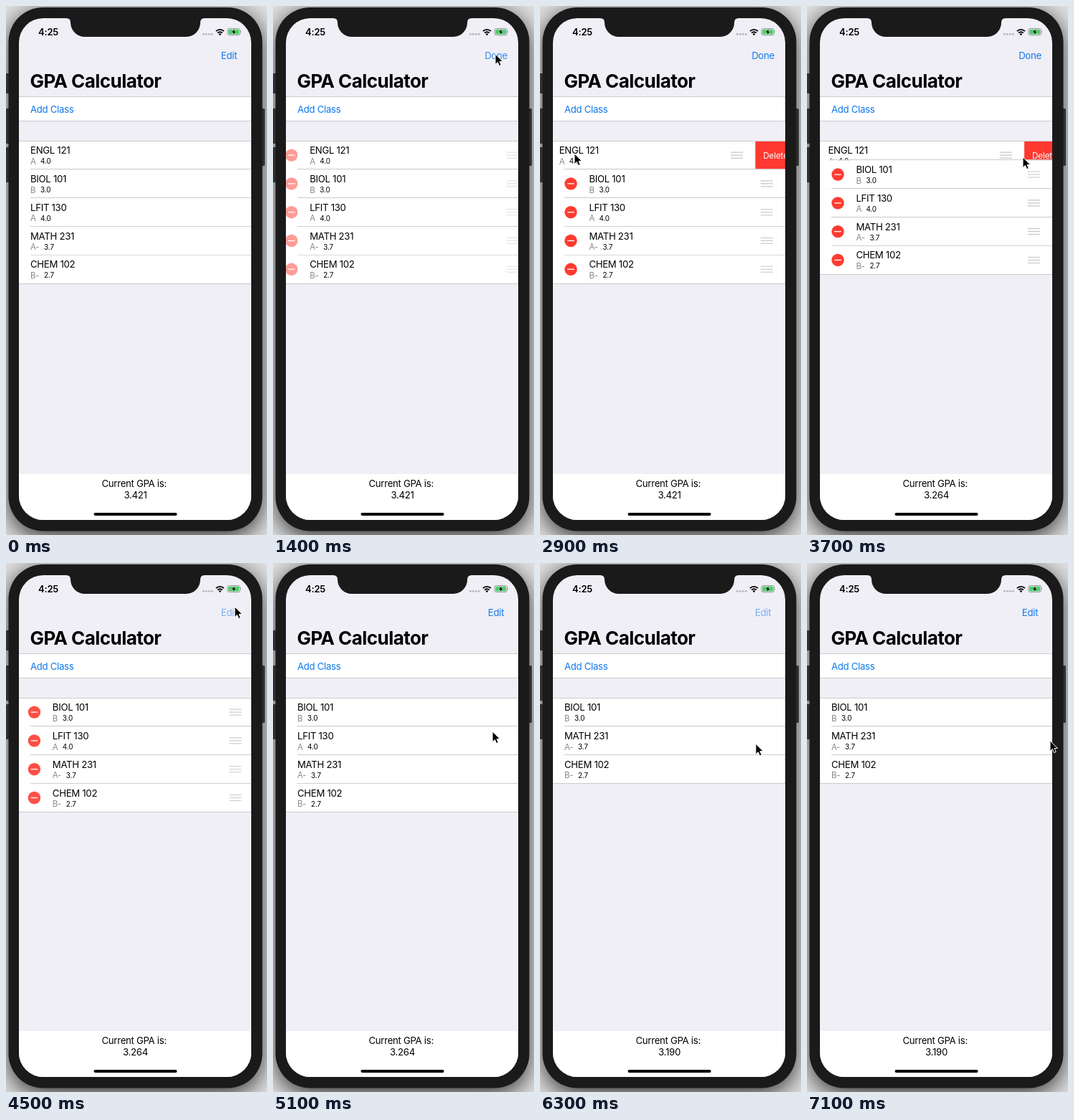
These frames come from a looping animation (364 px wide and 738 px high, 7.2 s). An HTML page:

```html
<!DOCTYPE html>
<html lang="en">
<head>
<meta charset="utf-8">
<title>GPA Calculator</title>
<style>
html, body { margin: 0; width: 100%; height: 100%; overflow: hidden; background: #ddd; }
svg { display: block; width: 364px; height: 738px; }
text { font-family: Inter, Roboto, sans-serif; font-size: 13.2px; letter-spacing: -0.3px; }
.blue { fill: #0f78ec; }
.mid { text-anchor: middle; }
.grade { font-size: 11.5px; fill: #8a8a8e; }
.points { font-size: 9.9px; letter-spacing: -0.1px; }
.del { font-size: 11.7px; letter-spacing: -0.15px; fill: #fff; }
.line { stroke: #cbcbce; stroke-width: 1; }
</style>
</head>
<body>
<svg viewBox="0 0 364 738">
  <defs>
    <clipPath id="screen"><rect x="18" y="17" width="324" height="700" rx="34"/></clipPath>
    <filter id="blur" x="-20%" y="-20%" width="140%" height="140%"><feGaussianBlur stdDeviation="16"/></filter>
  </defs>

  <rect width="364" height="738" fill="#e0e0e0"/>
  <rect x="4" y="8" width="353" height="734" rx="48" opacity=".75" filter="url(#blur)"/>
  <g fill="#303030">
    <rect x="-2" y="94" width="8" height="28"/>
    <rect x="-2" y="143" width="8" height="49"/>
    <rect x="-2" y="197" width="8" height="49"/>
    <rect x="355" y="143" width="6" height="80" rx="1.5"/>
  </g>
  <rect x="3.5" y="2" width="354" height="730.5" rx="48" fill="#1a1a1b"/>

  <g clip-path="url(#screen)">
    <rect x="18" y="17" width="324" height="700" fill="#f0eff6"/>
    <text x="33.5" y="113.5" style="font-size:26px;font-weight:700;letter-spacing:-.55px">GPA Calculator</text>
    <rect x="18" y="126.5" width="324" height="34" fill="#fff"/>
    <path class="line" d="M18 126.5H342M18 160.5H342"/>
    <text class="blue" x="34" y="148.5">Add Class</text>
    <text class="blue mid" id="button" x="311" y="73.5"></text>
    <g id="list"></g>
    <rect x="18" y="653" width="324" height="64" fill="#fff"/>
    <text class="mid" x="178.7" y="671.2">Current GPA is:</text>
    <text class="mid" id="gpa" x="180.5" y="687.3"></text>
    <rect x="122.5" y="707" width="116" height="4" rx="2"/>
  </g>

  <path fill="#1a1a1b" d="M84 16V17Q90 17 90 23A20 20 0 0 0 110 43H251A20 20 0 0 0 271 23Q271 17 277 17V16Z"/>

  <text x="45" y="41" style="font-weight:600;font-size:13px;letter-spacing:-.2px">4:25</text>
  <g fill="#b8b8be">
    <circle cx="275.3" cy="39.3" r="1.5"/><circle cx="279.3" cy="39.3" r="1.5"/>
    <circle cx="283.3" cy="39.3" r="1.5"/><circle cx="287.3" cy="39.3" r="1.5"/>
  </g>
  <g fill="none" stroke="#000" stroke-width="1.9">
    <path d="M292.9 35.2A7.6 7.6 0 0 1 303.9 35.2"/>
    <path d="M295.1 37.6A4.6 4.6 0 0 1 301.7 37.6"/>
  </g>
  <path d="M298.4 41.2L296.6 39.2A2.6 2.6 0 0 1 300.2 39.2Z"/>
  <rect x="308.9" y="31.5" width="17.6" height="9.2" rx="2.4" fill="none" stroke="#8f8f93" stroke-width=".9"/>
  <rect x="310.2" y="32.8" width="15" height="6.6" rx="1.2" fill="#4ccf68"/>
  <path d="M327.4 34.6Q329 36.1 327.4 37.6Z" fill="#8f8f93"/>
  <path d="M318.9 32.2L314.6 36.7H317.3L316.6 40L320.8 35.4H318.1Z" stroke="#d5f0dc" stroke-width="1" paint-order="stroke"/>

  <path id="cursor" d="M0 0V14.6L3.4 11.4L5.6 16.6L8.2 15.5L6 10.4H10.5Z" stroke="#fff" stroke-width="1" stroke-linejoin="round"/>
</svg>

<script>
const LOOP = 7200, STEP = 100;
const ROW = 39.8, TOP = 188.5, EDIT_SHIFT = 34.4, DELETE_W = 61;

const EDIT_ON = 1250, EDIT_OFF = 4440, ANIM = 300, FADE = 240;

// open/remove: times at which the delete button slides in and the row collapses
const classes = [
  { name: "ENGL 121", grade: "A", points: "4.0", open: 2700, remove: 3590 },
  { name: "BIOL 101", grade: "B", points: "3.0" },
  { name: "LFIT 130", grade: "A", points: "4.0", open: 5300, remove: 5840 },
  { name: "MATH 231", grade: "A-", points: "3.7" },
  { name: "CHEM 102", grade: "B-", points: "2.7" }
];
const labels = [[-ANIM, "Edit"], [EDIT_ON, "Done"], [EDIT_OFF, "Edit"], [5300, "Done"], [6240, "Edit"]];
const totals = [[0, "3.421"], [3590, "3.264"], [5840, "3.190"]];
const path = [
  [700, 329, 150], [1200, 310, 67], [1450, 310, 67], [1800, 343, 112], [2200, 316, 160],
  [2650, 48, 206], [3000, 48, 206], [3500, 301, 211], [3750, 301, 211],
  [4300, 319, 61], [4600, 319, 61], [5200, 305, 249], [5500, 245, 249],
  [5750, 309, 249], [6200, 309, 249], [6600, 257, 270], [6900, 285, 256],
  [7000, 303, 252], [7100, 339, 248]
];

const $ = id => document.getElementById(id);
const ramp = (t, start, length) => {
  const p = Math.min(1, Math.max(0, (t - start) / length));
  return p * p * (3 - 2 * p);
};
const latest = (list, t) => list.filter(item => item[0] <= t).pop();

function rowMarkup(c, y, height, edit, swipe, last) {
  const x = 34 + EDIT_SHIFT * edit - swipe;
  const mid = y + 19.6;
  const slide = EDIT_SHIFT * (1 - edit);
  const minusX = 43 - slide - swipe;
  const gripX = 316.3 + slide * 1.04 - swipe;
  const gap = c.grade.length > 1 ? 19 : 14;
  const controls = edit > 0 ? `<g opacity="${edit}">
    <circle cx="${minusX}" cy="${mid}" r="8.7" fill="#ff3b30"/>
    <path d="M${minusX - 4.8} ${mid}h9.6" stroke="#fff" stroke-width="1.3"/>
    <path d="M${gripX - 8.5} ${mid - 4}h17m-17 4h17m-17 4h17" stroke="#c5c5c9" stroke-width="1.1"/></g>` : "";
  const remove = swipe > 0 ? `<rect x="${342 - swipe}" y="${y}" width="${swipe}" height="${height}" fill="#ff3830"/>
    <text class="del" x="${353 - swipe}" y="${y + 24}">Delete</text>` : "";
  const lineY = Math.round(y + height) - 0.5;
  return `<rect x="18" y="${y}" width="324" height="${ROW}" fill="#fff"/>
    <text x="${x}" y="${y + 17.6}">${c.name}</text>
    <text class="grade" x="${x}" y="${y + 32.2}">${c.grade}</text>
    <text class="points" x="${x + gap}" y="${y + 31.6}">${c.points}</text>
    ${controls}${remove}
    ${last ? `<rect x="18" y="${y + height}" width="324" height="${ROW}" fill="#f0eff6"/>` : ""}
    <path class="line" d="M${last ? 18 : 34} ${lineY}H342"/>`;
}

function drawList(t) {
  const edit = ramp(t, EDIT_ON, ANIM) - ramp(t, EDIT_OFF, ANIM);
  let y = TOP, markup = "";
  classes.forEach((c, i) => {
    const gone = c.remove ? ramp(t, c.remove, 290) : 0;
    if (gone === 1) return;
    // the row slides back slightly ahead of its collapse
    const swipe = c.open ? DELETE_W * (ramp(t, c.open, 320) - ramp(t, c.remove - 8, 290)) : 0;
    const height = ROW * (1 - gone);
    markup += rowMarkup(c, y, height, edit, swipe, i === classes.length - 1);
    y += height;
  });
  $("list").innerHTML = markup + '<path class="line" d="M18 188.5H342"/>';
}

function drawButton(t) {
  const [start, label] = latest(labels, t);
  const pressed = [EDIT_ON, EDIT_OFF].some(click => t >= click - 100 && t < click);
  $("button").textContent = label;
  $("button").setAttribute("opacity", pressed ? 0.35 : 0.45 + 0.55 * ramp(t, start, FADE));
}

function drawCursor(t) {
  const a = latest(path, t);
  $("cursor").style.display = a ? "" : "none";
  if (!a) return;
  const b = path[path.indexOf(a) + 1] || a;
  const p = b === a ? 0 : ramp(t, a[0], b[0] - a[0]);
  const x = a[1] + (b[1] - a[1]) * p, y = a[2] + (b[2] - a[2]) * p;
  $("cursor").setAttribute("transform", `translate(${x} ${y})`);
}

function draw(t) {
  drawList(t);
  drawButton(t);
  drawCursor(t);
  $("gpa").textContent = latest(totals, t)[1];
}

const begin = performance.now();
let shown = -1;
function tick() {
  const t = Math.floor(((performance.now() - begin) % LOOP) / STEP) * STEP;
  if (t !== shown) draw(shown = t);
  requestAnimationFrame(tick);
}
tick();
</script>
</body>
</html>
```
